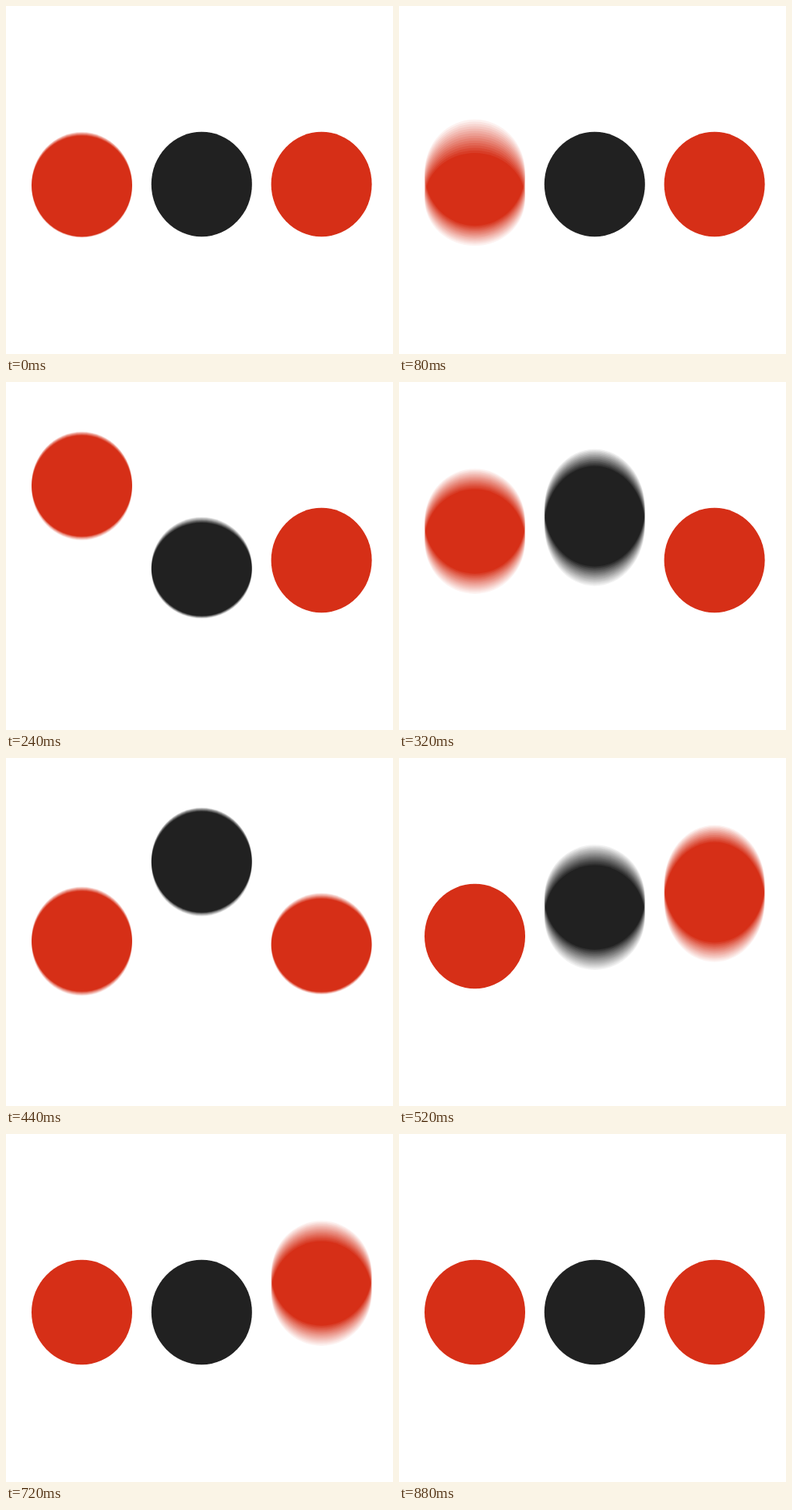
An HTML page with a canvas for the animation above (0.92 s loop, 500x450 px).

```html
<!DOCTYPE html>
<html lang="en">
<head>
<meta charset="utf-8">
<title>Bouncing dots</title>
<style>
  html, body { margin: 0; width: 100%; height: 100%; overflow: hidden; background: #fff; }
  canvas { display: block; width: 500px; height: 450px; }
</style>
</head>
<body>
<canvas id="stage" width="500" height="450"></canvas>
<script>
const ctx = document.getElementById('stage').getContext('2d');
const STEP = 40, LOOP = 920;
const SHUTTER = 0.5, SAMPLES = 15;
const RADIUS = 65, GAP = 154.8, DELAY = 5;
const REST = 230.5, HEIGHT = 135.4;
const colors = ['#d62f17', '#212121', '#d62f17'];

const linear = u => u;
const easeIn = p => u => u ** p;
const easeOut = p => u => 1 - (1 - u) ** p;

// Keys: time in steps, value, easing towards it
const centre = [
  { t: 0, v: REST },
  { t: 2, v: 250, ease: easeIn(1.3) },      // crouch
  { t: 5, v: 129.2, ease: easeOut(1.85) },  // rise
  { t: 9, v: 239.6, ease: easeIn(2.7) },    // fall
  { t: 10, v: 255.2, ease: easeOut(1.5) },  // land
  { t: 12, v: REST, ease: easeOut(1.4) }
];
const height = [
  { t: 0, v: HEIGHT },
  { t: 2, v: 120, ease: linear },
  { t: 3, v: 155, ease: linear },
  { t: 6, v: HEIGHT, ease: linear },
  { t: 9, v: HEIGHT, ease: linear },
  { t: 10, v: 116.4, ease: linear },
  { t: 11, v: HEIGHT, ease: linear }
];

function valueAt(keys, t) {
  if (t <= 0) return keys[0].v;
  const i = keys.findIndex(key => key.t > t);
  if (i < 0) return keys[keys.length - 1].v;
  const a = keys[i - 1], b = keys[i];
  return a.v + (b.v - a.v) * b.ease((t - a.t) / (b.t - a.t));
}

// Adds up faint copies over the shutter time, then tints the sum
function drawBall(color, index, step) {
  const x = 98 + GAP * index;
  const start = step - DELAY * index;
  const open = start < 0 ? 0 : SHUTTER;
  ctx.globalCompositeOperation = 'lighter';
  ctx.globalAlpha = 1 / SAMPLES;
  ctx.fillStyle = '#000';
  for (let i = 0; i < SAMPLES; i++) {
    const t = start + open * i / (SAMPLES - 1);
    ctx.beginPath();
    ctx.ellipse(x, valueAt(centre, t), RADIUS, valueAt(height, t) / 2, 0, 0, Math.PI * 2);
    ctx.fill();
  }
  ctx.globalCompositeOperation = 'source-atop';
  ctx.globalAlpha = 1;
  ctx.fillStyle = color;
  ctx.fillRect(x - GAP / 2, 0, GAP, 450);
}

function draw(ms) {
  const step = Math.floor((ms % LOOP) / STEP);
  ctx.clearRect(0, 0, 500, 450);
  colors.forEach((color, index) => drawBall(color, index, step));
}

let begin = null;
function tick(now) {
  if (begin === null) begin = now;
  draw(Math.max(0, now - begin));
  requestAnimationFrame(tick);
}
draw(0);
requestAnimationFrame(tick);
</script>
</body>
</html>
```
